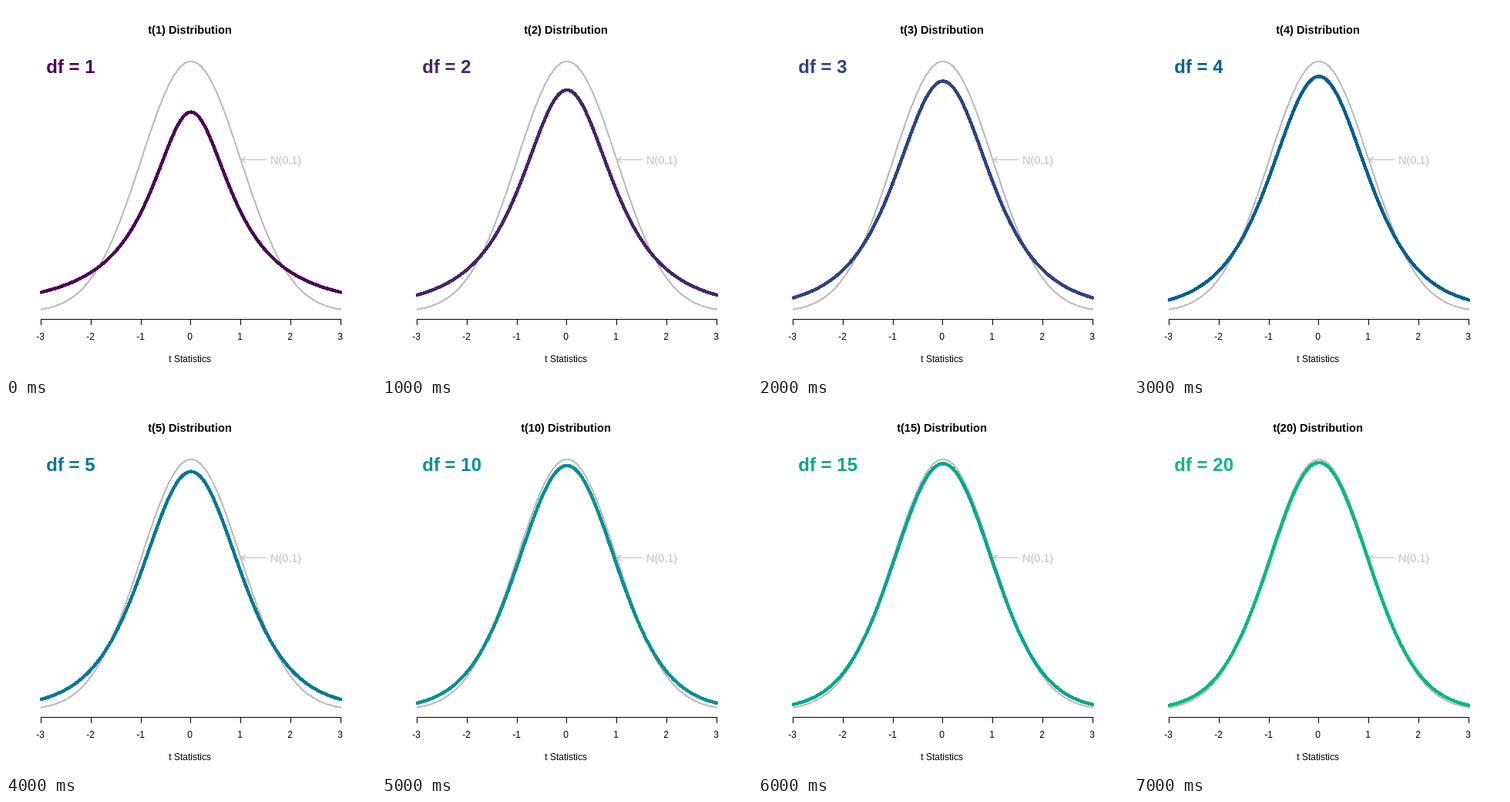
An HTML page that plays this animation: 480x480 px, repeating every 8000 ms.

```html
<!DOCTYPE html>
<html lang="en">
<head>
<meta charset="utf-8">
<title>t distribution</title>
<style>
  html, body { margin: 0; width: 100%; height: 100%; overflow: hidden; background: #fff; }
  svg { display: block; font: 12px Arial, "Liberation Sans", sans-serif; }
  path { fill: none; shape-rendering: crispEdges; stroke-linecap: round; stroke-linejoin: round; }
  .mid { text-anchor: middle; }
  .bold { font-weight: bold; }
</style>
</head>
<body>
<svg width="480" height="480" viewBox="0 0 480 480">
  <path id="normal" stroke="#bebebe" stroke-width="2.2"/>
  <path d="M304.5 199.5H337.5M310.8 196.3L304.5 199.5L310.8 203.5" stroke="#bebebe"/>
  <text x="343" y="205" font-size="14.4" fill="#bebebe">N(0,1)</text>
  <path id="student" stroke-width="4.5"/>
  <path id="axis" stroke="#000"/>
  <g id="ticks" class="mid"></g>
  <text class="mid" x="238.7" y="462">t Statistics</text>
  <text id="title" class="mid bold" x="238.5" y="36" font-size="14.6"></text>
  <text id="label" class="bold" x="52.3" y="87" font-size="24"></text>
</svg>
<script>
const $ = id => document.getElementById(id);
const degrees = [1, 2, 3, 4, 5, 10, 15, 20];
const STEP = 1000, PALETTE_SIZE = 12, SAMPLES = 300;

const toX = x => 239.99 + 64.74 * x;
const toY = density => 71.91 + 815.6 * (0.39894 - density);

const normal = x => Math.exp(-x * x / 2) / Math.sqrt(2 * Math.PI);

// Gamma((n + 1) / 2) / Gamma(n / 2)
const gammaRatio = n => n === 1 ? 1 / Math.sqrt(Math.PI) : (n - 1) / 2 / gammaRatio(n - 1);

const student = n => {
  const peak = gammaRatio(n) / Math.sqrt(n * Math.PI);
  return x => peak * (1 + x * x / n) ** (-(n + 1) / 2);
};

function curve(density) {
  let d = '';
  for (let i = 0; i <= SAMPLES; i++) {
    const x = -3 + 6 * i / SAMPLES;
    d += `${i ? 'L' : 'M'}${toX(x).toFixed(2)} ${toY(density(x)).toFixed(2)}`;
  }
  return d;
}

// Polar LUV to sRGB
function hcl(h, c, l) {
  const a = h * Math.PI / 180;
  const u = c * Math.cos(a) / (13 * l) + 0.19784;
  const v = c * Math.sin(a) / (13 * l) + 0.46834;
  const Y = ((l + 16) / 116) ** 3;
  const X = 9 * Y * u / (4 * v);
  const Z = 3 * Y / v - X / 3 - 5 * Y;
  const channel = w => Math.round(255 * Math.min(1, Math.max(0,
    w > 0.00304 ? 1.055 * w ** (1 / 2.4) - 0.055 : 12.92 * w)));
  return `rgb(${[
    3.240479 * X - 1.53715 * Y - 0.498535 * Z,
    -0.969256 * X + 1.875992 * Y + 0.041556 * Z,
    0.055648 * X - 0.204043 * Y + 1.057311 * Z
  ].map(channel)})`;
}

function viridis(k) {
  const i = 1 - k / (PALETTE_SIZE - 1);
  return hcl(75 + 225 * i, 95 - 55 * i, 90 - 75 * i ** 1.1);
}

let axis = 'M45.5 406.5H434.5';
for (let t = -3; t <= 3; t++) {
  const x = Math.floor(toX(t)) + 0.5;
  axis += `M${x} 406.5V413.5`;
  $('ticks').innerHTML += `<text x="${x - 1}" y="433">${t}</text>`;
}
$('axis').setAttribute('d', axis);
$('normal').setAttribute('d', curve(normal));

let shown = -1;
function draw() {
  const k = Math.floor(performance.now() / STEP) % degrees.length;
  if (k !== shown) {
    shown = k;
    const df = degrees[k], color = viridis(k);
    $('title').textContent = `t(${df}) Distribution`;
    $('label').textContent = `df = ${df}`;
    $('label').setAttribute('fill', color);
    $('student').setAttribute('d', curve(student(df)));
    $('student').setAttribute('stroke', color);
  }
  requestAnimationFrame(draw);
}
draw();
</script>
</body>
</html>
```
